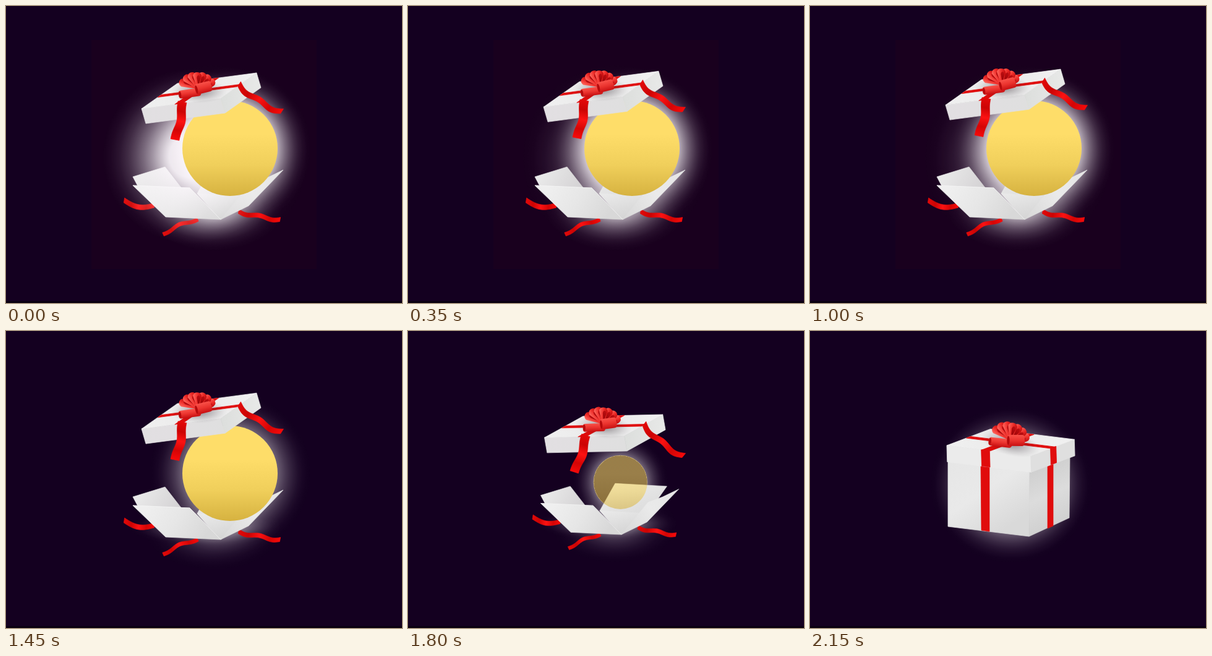
An HTML page with a canvas for the animation above (2.2 s loop, 640x480 px).

```html
<!DOCTYPE html>
<html lang="en">
<head>
<meta charset="utf-8">
<title>Gift box</title>
<style>
  html, body { margin: 0; width: 100%; height: 100%; overflow: hidden; background: #140020; }
  canvas { display: block; width: 640px; height: 480px; }
</style>
</head>
<body>
<canvas id="stage" width="640" height="480"></canvas>
<script>
const LOOP = 2200, CLOSING = 1450;
const RED = '#e00c0c';
const stage = document.getElementById('stage').getContext('2d');
const layer = document.createElement('canvas');
layer.width = 640;
layer.height = 480;
const g = layer.getContext('2d');

const ramp = (t, from, to) => Math.min(1, Math.max(0, (t - from) / (to - from)));

function poly(fill, ...points) {
  g.beginPath();
  points.forEach(p => g.lineTo(...p));
  g.closePath();
  g.fillStyle = g.strokeStyle = fill;
  g.lineWidth = .7;
  g.fill();
  g.stroke();
}

function shade(x0, y0, x1, y1, ...colors) {
  const grad = g.createLinearGradient(x0, y0, x1, y1);
  colors.forEach((c, i) => grad.addColorStop(i / (colors.length - 1), c));
  return grad;
}

// Soft elliptical light that fades out from the fraction `core` of its radius.
function glow(x, y, rx, ry, alpha, { core = 0, rgb = '255,250,255', power = 2, hollow = false } = {}) {
  const grad = g.createRadialGradient(0, 0, 0, 0, 0, 1);
  if (hollow) {
    grad.addColorStop(0, 'transparent');
    grad.addColorStop(core, 'transparent');
  }
  for (let s = 0; s <= 1; s += 1 / 8) {
    grad.addColorStop(core + (1 - core) * s, `rgba(${rgb},${alpha * (1 - s) ** power})`);
  }
  g.save();
  g.translate(x, y);
  g.scale(rx, ry);
  g.fillStyle = grad;
  g.fillRect(-1, -1, 2, 2);
  g.restore();
}

// Moves the pivot (px, py) of a drawing to (x, y).
function placed(x, y, degrees, scale, px, py, draw) {
  g.save();
  g.translate(x, y);
  g.rotate(degrees * Math.PI / 180);
  g.scale(scale, scale);
  g.translate(-px, -py);
  draw();
  g.restore();
}

// A wavy strip around the line between its two ends.
function ribbon(x0, y0, x1, y1, width, sag, wave) {
  const dx = x1 - x0, dy = y1 - y0, length = Math.hypot(dx, dy);
  const near = [], far = [];
  for (let s = 0; s <= 1; s += 1 / 32) {
    const mid = sag * Math.sin(Math.PI * s) + wave * Math.sin(3 * Math.PI * s);
    const side = off => [x0 + dx * s - dy / length * off, y0 + dy * s + dx / length * off];
    near.push(side(mid - width / 2));
    far.unshift(side(mid + width / 2));
  }
  poly(shade(x0, y0, x1, y1, '#e20909', '#cc0404', '#fc1212', '#d40505', '#f60a0a'), ...near, ...far);
}

function petal(degrees, length, width) {
  const loop = (l, w) => new Path2D(`M0 0L${-w} ${-l * .8}Q${-w * .8} ${-l} 0 ${-l}Q${w} ${-l} ${w} ${-l * .7}Z`);
  placed(309, 134, degrees, 1, 0, 0, () => {
    g.fillStyle = shade(-width, 0, width, 0, '#ff6a60', '#ee302c', '#c20a0c');
    g.fill(loop(length, width));
    g.translate(width * .3, -3);
    g.fillStyle = shade(0, 0, 0, -length, '#8f0004', '#d01416');
    g.fill(loop(length * .7, width * .4));
  });
}

function knot(x, y, degrees, width, height) {
  placed(x, y, degrees, 1, 0, 0, () => {
    g.fillStyle = shade(0, -height / 2, 0, height / 2, '#f95149', '#ea332e', '#c81012');
    g.beginPath();
    g.roundRect(-width / 2, -height / 2, width, height, 4);
    g.fill();
    g.fillStyle = '#b50a0c';
    g.beginPath();
    g.ellipse(-width / 2 + 2, 0, 2, height * .4, 0, 0, 7);
    g.fill();
  });
}

function bow() {
  glow(312, 138, 46, 19, .5, { rgb: '40,30,40', power: 1.3 });
  for (const i of [3, 2, 1, 0]) {
    for (const side of i ? [-1, 1] : [1]) petal(side * i * 22, 27 + i * 1.5, 7);
  }
  knot(297, 141, -8, 36, 13);
  knot(319, 132, -14, 27, 17);
}

function lid(closed) {
  const at = (u, v) => [219 + 128 * u + 58 * v, 166 - 17 * u - 41 * v];
  const drop = ([x, y]) => [x + 7, y + 24];
  const face = (fill, p, q) => poly(fill, p, q, drop(q), drop(p));
  face(closed ? '#ebebeb' : shade(219, 0, 354, 0, '#e2dfe2', '#dfdfdf'), at(0, 0), at(1, 0));
  face(closed ? '#dfdfdf' : shade(347, 0, 411, 0, '#dcdedc', '#e8e9e8'), at(1, 0), at(1, 1));
  poly(shade(219, 166, 405, 108, '#f0f0f0', '#eaeaea', '#f1f1f1'), at(0, 0), at(1, 0), at(1, 1), at(0, 1));
  poly(RED, at(0, .45), at(0, .55), at(1, .55), at(1, .45));
  poly(RED, at(.42, 0), at(.52, 0), at(.52, 1), at(.42, 1));
  if (closed) {
    face(RED, at(.41, 0), at(.51, 0));
    face(RED, at(1, .45), at(1, .58));
  } else {
    ribbon(285, 155, 273, 216, 14, -3, 1);
    ribbon(377, 126, 446, 170, 9, 7, 3);
  }
  bow();
}

function base() {
  ribbon(191, 314, 240, 322, 8, 7, 0);
  ribbon(254, 369, 310, 345, 6, -3, 1.5);
  ribbon(376, 332, 443, 345, 7, 2, 2);

  const front = [[205, 290], [297, 294], [347, 345]], tip = [448, 265];
  const corner = [309, 303], crease = [393, 308];
  poly(shade(220, 266, 275, 300, '#e9e9e9', '#d4d2d4'), [205, 276], [257, 260], [285, 296], [213, 291]);
  poly(shade(340, 255, 370, 325, '#ececec', '#dadada'), [336, 255], [427, 260], crease, front[2], corner);
  poly(shade(340, 300, 350, 345, '#e9e9e9', '#d4d4d4'), corner, crease, front[2]);
  poly(shade(350, 340, 448, 265, '#d9d9d9', '#eaeaea', '#e6e6e6'), tip, [419, 279], [394, 288], front[2], [392, 323]);
  poly(shade(230, 290, 320, 345, '#efefef', '#e6e6e6', '#d8d8d8'), ...front, [258, 341]);
  g.strokeStyle = '#f6f6f6';
  g.beginPath();
  front.forEach(p => g.lineTo(...p));
  g.stroke();
}

function ball(x, y, r, alpha) {
  g.globalAlpha = alpha;
  g.fillStyle = shade(0, y - r * .3, 0, y + r, '#fedd69', '#f0cf5b', '#d6b240');
  g.beginPath();
  g.arc(x, y, r, 0, 7);
  g.fill();
  g.globalAlpha = 1;
}

function openGift(t) {
  const bright = t < CLOSING;
  const close = Math.max(0, (t - 1500) / 400);
  const shrink = Math.max(0, (t - 1690) / 210);
  const rise = 8 * Math.min(1, t / 1500) ** .75;
  const x = 362 - 25 * close, y = 230 + 19 * close, r = 77 - 44.5 * close;
  const size = 1 - .155 * shrink, bx = 347 - 4 * shrink;
  const by = bright ? 345 : 337 - 12 * ramp(t, 1600, 1900);
  const reach = r * 1.6 + 8;

  if (bright) glow(336, 246, 153, 153, .8);
  else glow(bx - 26 * size, by - 20 * size, 125 * size, 30 * size, .8);
  glow(bx - 12 * size, by - 15 * size, 112 * size, 65 * size, bright ? .9 : .45);
  glow(x, y, reach, reach, bright ? .68 : .4, { core: r / reach * .98, hollow: true });

  g.globalAlpha = 1 - .4 * ramp(t, 1800, 1900);
  placed(bx, by, 0, size, 347, 345, base);
  g.globalAlpha = 1;

  const burst = 1 - ramp(t, 0, 350), spread = 128 + 14 * burst;
  glow(298, 243, spread, spread, .88 * burst, { core: .24, power: 1.7 });
  ball(x, y, r, 1 - .57 * close);
  placed(219 + 2 * close, 166 - rise + 19 * close, 8.4 * close, 1, 219, 166, () => lid(false));
}

function closedGift() {
  glow(325, 248, 132, 128, .62, { core: .5 });
  poly(shade(223, 214, 300, 330, '#e6e6e6', '#e9e9e9', '#d9d9d9'), [223, 208], [355, 224], [354, 332], [223, 316]);
  poly(shade(355, 220, 400, 318, '#cdcdcd', '#dcdcdc', '#cfcfcf'), [355, 224], [420, 198], [419, 302], [354, 332]);
  poly(RED, [276, 215], [290, 217], [290, 324], [277, 322]);
  poly(RED, [384, 212], [393, 208], [393, 315], [384, 319]);
  placed(221, 185, 14.6, 1.06, 219, 166, () => lid(true));
}

function compose(alpha, draw) {
  if (alpha <= 0) return;
  g.clearRect(0, 0, 640, 480);
  draw();
  stage.globalAlpha = alpha;
  stage.drawImage(layer, 0, 0);
  stage.globalAlpha = 1;
}

function rect(color, x, y, w, h) {
  stage.fillStyle = color;
  stage.fillRect(x, y, w, h);
}

// The slow hover moves in longer steps than the rest.
function stepped(t) {
  const hovering = t >= 350 && t < CLOSING;
  const from = !hovering ? 0 : t < 850 ? 350 : 850;
  const step = hovering ? 150 : 50;
  return from + Math.floor((t - from) / step) * step;
}

function frame(now) {
  const t = stepped(now % LOOP);
  rect('#140020', 0, 0, 640, 480);
  if (t < CLOSING) rect('#19001e', 138, 55, 364, 370);
  rect('#0a0010', 0, 477, 640, 3);
  compose(1 - ramp(t, 1850, 2050), () => openGift(t));
  compose(ramp(t, 1950, 2150), closedGift);
}

const start = performance.now();
function run() {
  frame(performance.now() - start);
  requestAnimationFrame(run);
}
run();
</script>
</body>
</html>
```
